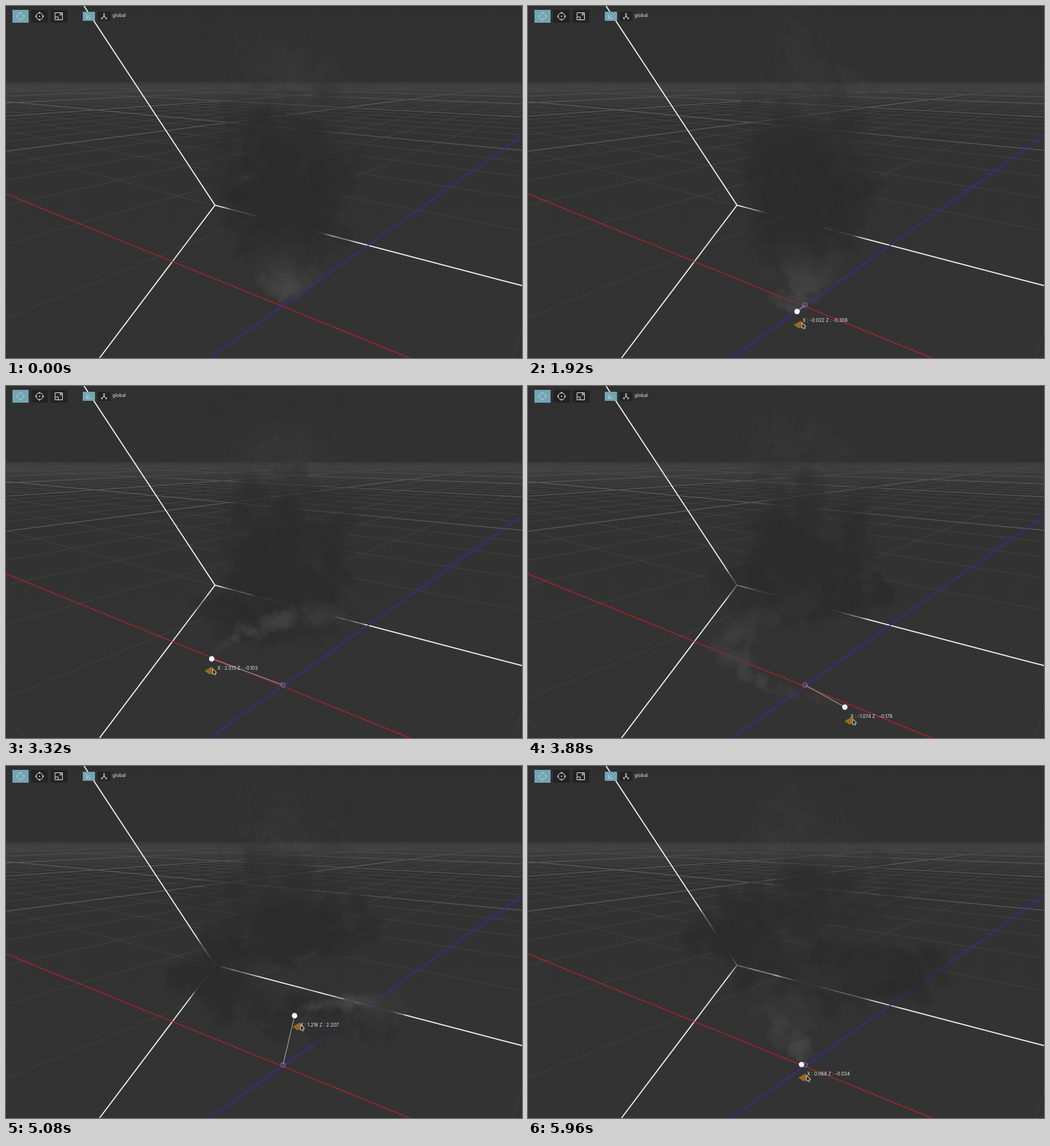
An HTML page with a canvas for the animation above (6000 ms loop, 800x547 px).

```html
<!DOCTYPE html>
<html lang="en">
<head>
<meta charset="utf-8">
<title>Smoke emitter</title>
<style>
  html, body { margin: 0; width: 100%; height: 100%; overflow: hidden; background: #323232; }
  svg, canvas { position: absolute; left: 0; top: 0; width: 800px; height: 547px; display: block; }
  text { font: 7.2px Inter, "Open Sans", sans-serif; fill: #e8e8e8; }
</style>
</head>
<body>
<svg viewBox="0 0 800 547">
  <defs>
    <linearGradient id="sky" x1="0" y1="0" x2="0" y2="1">
      <stop offset="0" stop-color="#303030"/><stop offset=".3" stop-color="#323232"/>
      <stop offset="1" stop-color="#333333"/>
    </linearGradient>
    <linearGradient id="minor" gradientUnits="userSpaceOnUse" x1="0" y1="117" x2="0" y2="160">
      <stop offset="0" stop-color="#484848" stop-opacity="0"/>
      <stop offset=".3" stop-color="#484848" stop-opacity=".5"/>
      <stop offset="1" stop-color="#444444"/>
    </linearGradient>
    <linearGradient id="major" gradientUnits="userSpaceOnUse" x1="0" y1="117" x2="0" y2="150">
      <stop offset="0" stop-color="#5c5c5c" stop-opacity="0"/>
      <stop offset="1" stop-color="#5c5c5c"/>
    </linearGradient>
  </defs>
  <rect width="800" height="547" fill="url(#sky)"/>
  <g id="grid" fill="none"></g>
  <g fill="none" stroke-width="1.5">
    <path d="M324 309.5 121 0M324 309.5 145 547M324 309.5 800 434.5" stroke="#f4f4f4" stroke-width="1.7"/>
    <path d="M0 292 626 547" stroke="#ae212d"/>
    <path d="M316 547 800 202" stroke="#3a27b0"/>
  </g>
</svg>
<canvas id="smoke" width="800" height="547"></canvas>
<svg viewBox="0 0 800 547">
  <g fill="#72a5b4">
    <rect x="10" y="6" width="25" height="20"/><rect x="119" y="9" width="19" height="14"/>
  </g>
  <g fill="#232323">
    <rect x="39" y="6" width="26" height="20"/><rect x="69" y="6" width="26" height="20"/>
    <rect x="142" y="9" width="20" height="14"/>
  </g>
  <g fill="none" stroke="#e4e4e4" stroke-width="1">
    <path d="M20 12.5 22.5 10 25 12.5M20 19.5 22.5 22 25 19.5M19 13.5 16.500 16 19 18.500M26 13.500 28.500 16 26 18.500"/>
    <circle cx="52" cy="16" r="5.3"/>
    <path d="M52 9V12M52 20V23M45 16H48M56 16H59"/>
    <path d="M76 10.500H87.500V21.500H76ZM76 17H81V21.500M83 15 86 12M83.500 12H86V14.500"/>
    <path d="M125 13V19H132M125 19 130 14" stroke-dasharray="2 1"/>
    <path d="M152 12V16L148.500 19.500M152 16 155.500 19.500M150.500 13 152 11.500 153.500 13M148 17.500V20H150M156 17.500V20H154"/>
  </g>
  <g fill="#e4e4e4"><circle cx="52" cy="16" r="1"/><circle cx="152" cy="16" r="1.3"/></g>
  <text x="165" y="16.700">global</text>

  <g id="idle">
    <path d="M430 464V430" stroke="#12b812" stroke-width="1.800"/>
    <path d="M426 432 430 424.500 434 432Z" fill="#12c412"/>
    <path d="M429 465 408 480" stroke="#11119c" stroke-width="1.800"/>
    <path d="M402.500 484 406 477 410.500 483Z" fill="#11119c"/>
    <path d="M432 466 465 479" stroke="#981a1c" stroke-width="3.500" stroke-dasharray="1.300 1"/>
    <path d="M409 446 418.500 443.500V455L409 458.500Z" fill="#5c2020" stroke="#981a1c" stroke-dasharray="1.300 1"/>
    <path d="M446.500 442.500 457.500 445V457L446.500 453.500Z" fill="#20205c" stroke="#1c1ca4"/>
    <path d="M426 485 436.500 480.500 446 485.500 434.500 490.500Z" fill="#397c27"/>
    <circle cx="429.500" cy="464.500" r="4.100" fill="#fff"/>
  </g>
  <g id="drag">
    <line id="leash" x1="429.500" y1="464.500" stroke="#9a9a9a" stroke-width="1.200"/>
    <circle cx="429.500" cy="464.500" r="3.500" fill="none" stroke="#85859a"/>
    <path id="pad" d="M-8.500 .5 1-5 9 2-2 5Z" fill="#a0602a" stroke="#7f7d1e" stroke-width="1.200"/>
    <circle id="knob" r="4.200" fill="#fff"/>
    <text id="label" xml:space="preserve"></text>
  </g>
  <path id="cursor" d="M0 0V8.500L2 6.800 3.300 9.500 4.700 8.900 3.500 6.200H6Z" fill="#151515" stroke="#f0f0f0" stroke-width=".8"/>
</svg>
<script>
const $ = id => document.getElementById(id);
const LOOP = 6000, STEP = 40;
const lerp = (a, b, u) => a + (b - a) * u;
const clamp = u => Math.max(0, Math.min(1, u));
const ease = u => { u = clamp(u); return u * u * (3 - 2 * u); };

// Ground plane in perspective: both axes run to vanishing points on the horizon.
const HORIZON = 105, VPX = -456, VPZ = 936;
function project(x, z) {
  const qx = x * 0.0674, qz = z * 0.0853, d = 1 + qx + qz;
  return { x: (429.5 + qx * VPX + qz * VPZ) / d, y: (464.5 + (qx + qz) * HORIZON) / d, d };
}

function drawGrid() {
  const paths = { minor: "", major: "" };
  const ray = (vp, other, q) => {
    const d = 1 + q, x = (429.5 + q * other) / d, y = (466.5 + q * HORIZON) / d;
    const k = 900 / (y - HORIZON);
    return `M${vp} ${HORIZON}L${vp + (x - vp) * k} ${HORIZON + 900}`;
  };
  for (let n = -1; n <= 72; n++) {
    if (!n) continue;
    const kind = n % 6 ? "minor" : "major";
    paths[kind] += ray(VPZ, VPX, n * 0.2755) + ray(VPX, VPZ, n * 0.35);
  }
  $("grid").innerHTML = Object.keys(paths).map(kind =>
    `<path d="${paths[kind]}" stroke="url(#${kind})" stroke-width="${kind === "major" ? 1.2 : 0.8}"/>`).join("");
}

// Emitter path: [time, x, z]
const track = [
  [1480, 0, 0], [1740, -0.05, -0.55], [2040, 0, 0.05], [2520, 0.035, 2.15], [2920, 1.6, 1.45],
  [3320, 2.013, -0.103], [3580, 0.9, -0.85], [3760, -0.3, -0.65], [3960, -1.45, 0.2],
  [4160, -1.55, 1.2], [4440, -0.915, 2.573], [4760, 0.25, 2.85], [5080, 1.216, 2.207],
  [5340, 1.25, 0.8], [5560, 0.4, 0.08], [5760, 0.1, 0], [5960, 0.068, -0.034]
];
const GRAB = track[0][0];
function emitter(t) {
  const last = track.length - 1;
  if (t <= GRAB) return [0, 0];
  if (t >= track[last][0]) return track[last].slice(1);
  const i = track.findIndex(k => k[0] > t) - 1;
  const a = track[i], b = track[i + 1], span = b[0] - a[0], u = (t - a[0]) / span;
  const slope = (j, c) => j <= 0 || j >= last ? 0
    : (track[j + 1][c] - track[j - 1][c]) / (track[j + 1][0] - track[j - 1][0]);
  return [1, 2].map(c => {
    const u2 = u * u, u3 = u2 * u;
    return a[c] * (2 * u3 - 3 * u2 + 1) + b[c] * (3 * u2 - 2 * u3)
      + span * (slope(i, c) * (u3 - 2 * u2 + u) + slope(i + 1, c) * (u3 - u2));
  });
}

const rand = (k, n) => {
  const v = Math.sin(k * 12.9898 + n * 78.233) * 43758.5453;
  return v - Math.floor(v);
};

// A puff is a small clump of soft discs.
function makePuff(seed, rgb) {
  const c = document.createElement("canvas");
  c.width = c.height = 96;
  const g = c.getContext("2d");
  for (let i = 0; i < 11; i++) {
    const angle = rand(seed, i) * 6.283, r = 25 * Math.sqrt(rand(seed, i + 20));
    const x = 48 + r * Math.cos(angle), y = 48 + r * Math.sin(angle), size = 12 + 10 * rand(seed, i + 40);
    const soft = g.createRadialGradient(x, y, 0, x, y, size);
    soft.addColorStop(0, `rgba(${rgb},.55)`);
    soft.addColorStop(0.5, `rgba(${rgb},.38)`);
    soft.addColorStop(1, `rgba(${rgb},0)`);
    g.fillStyle = soft;
    g.fillRect(0, 0, 96, 96);
  }
  return c;
}
const seeds = [1, 2, 3, 4, 5, 6];
const lightPuffs = seeds.map(s => makePuff(s, "70,70,70"));
const darkPuffs = seeds.map(s => makePuff(s, "42,42,43"));
const ctx = $("smoke").getContext("2d");
const RATE = 64, LIFE = 5.3;

function drawSmoke(t) {
  ctx.setTransform(1, 0, 0, 1, 0, 0);
  ctx.clearRect(0, 0, 800, 547);
  const now = t / 1000;
  for (let k = Math.ceil((now - LIFE) * RATE); k <= now * RATE; k++) {
    const age = now - k / RATE, r = n => rand(k + 1000, n);
    const p = project(...emitter(k / RATE * 1000));
    const side = (r(1) + r(2) - 1) * 112 + (r(3) - 0.5) * 12 * age;
    const x = p.x + side * (1 - Math.exp(-age * 1.25)) / p.d;
    const y = p.y - 4 - age * (58 + 32 * r(4)) / p.d;
    const size = (9 + 34 * (1 - Math.exp(-age * 0.9))) * (0.75 + 0.5 * r(5)) / p.d;
    const alpha = 0.62 * clamp(age / 0.3 + 0.1) * (1 - 0.92 * ease((age - 2.1) / 2.3)) * clamp((LIFE - age) / 0.6);
    const dark = ease((age - 0.15) / 1.25);
    const turn = r(6) * 6.283 + (r(7) - 0.5) * age * 0.6;
    ctx.setTransform(Math.cos(turn), Math.sin(turn), -Math.sin(turn), Math.cos(turn), x, y);
    const i = Math.floor(r(8) * seeds.length);
    const stamp = (puff, a) => {
      if (a < 0.01) return;
      ctx.globalAlpha = a;
      ctx.drawImage(puff, -size, -size, size * 2, size * 2);
    };
    stamp(lightPuffs[i], alpha * (1 - dark) * 0.62);
    stamp(darkPuffs[i], alpha * dark);
  }
}

const place = (el, x, y) => el.setAttribute("transform", `translate(${x.toFixed(2)} ${y.toFixed(2)})`);
const show = (el, on) => el.setAttribute("visibility", on ? "visible" : "hidden");

function drawTools(t) {
  const dragging = t >= GRAB;
  show($("idle"), t >= 320 && !dragging);
  show($("drag"), dragging);
  show($("cursor"), t >= 760);
  if (!dragging) {
    const enter = ease((t - 760) / 380), reach = ease((t - 1200) / 260);
    place($("cursor"), lerp(lerp(802, 561, enter), 438, reach), lerp(lerp(372, 408, enter), 483, reach));
    return;
  }
  const [x, z] = emitter(t), p = project(x, z);
  const padX = p.x + (p.x - 319) * 0.061 - 1.5, padY = p.y + 17.3 + (p.y - 400) * 0.04;
  $("leash").setAttribute("x2", p.x);
  $("leash").setAttribute("y2", p.y);
  place($("knob"), p.x, p.y);
  place($("pad"), padX, padY);
  place($("label"), p.x + 8.7, p.y + 16.6);
  $("label").textContent = `X : ${x.toFixed(3)} Z : ${z.toFixed(3)}`;
  place($("cursor"), padX + 3, padY - 2.5);
}

drawGrid();
const start = performance.now();
function frame() {
  const t = Math.floor((performance.now() - start) % LOOP / STEP) * STEP;
  drawSmoke(t);
  drawTools(t);
  requestAnimationFrame(frame);
}
frame();
</script>
</body>
</html>
```
